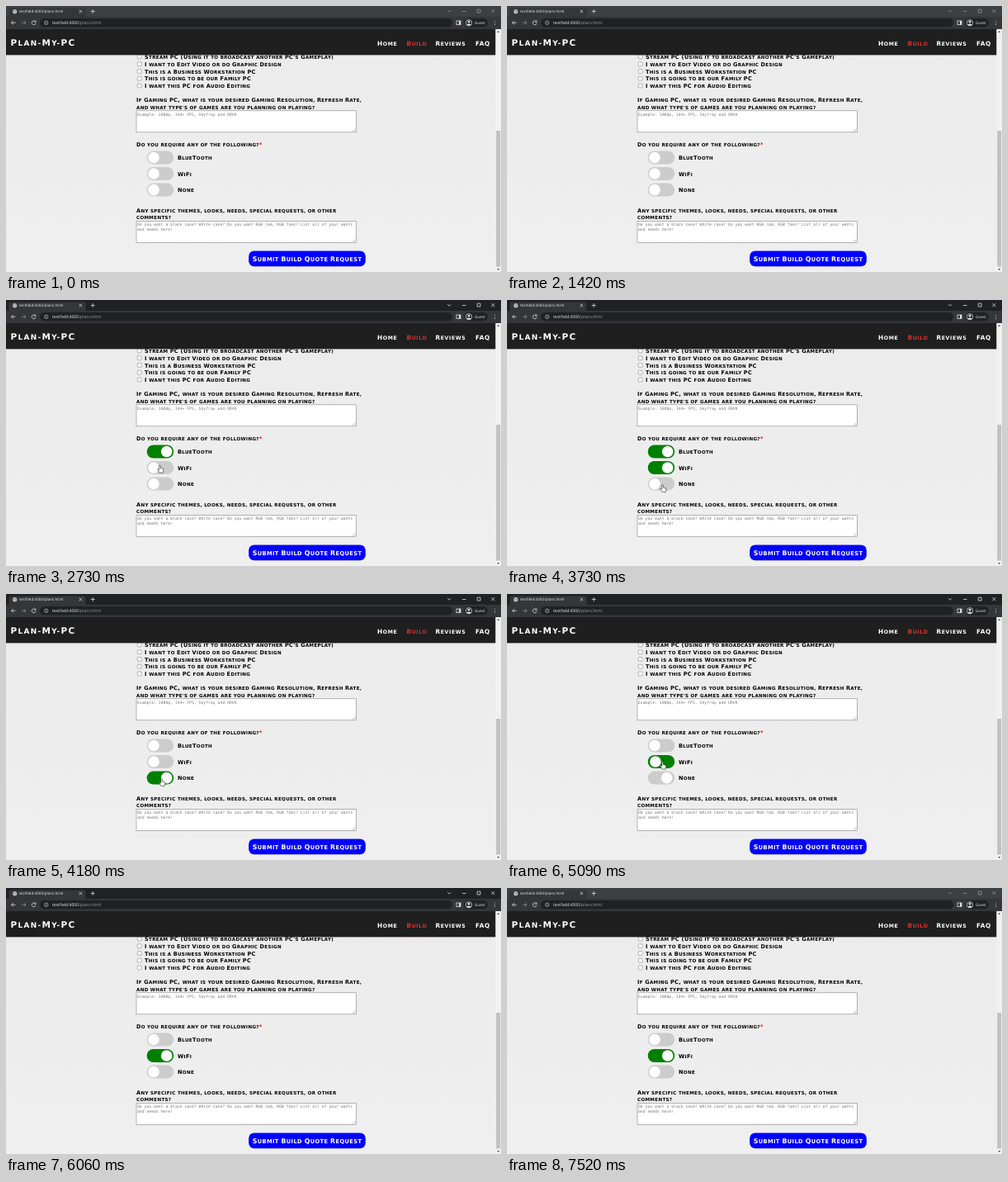
These frames come from a looping animation (600x322 px, 7560 ms). An HTML page:

```html
<!DOCTYPE html>
<html lang="en">
<head>
<meta charset="utf-8">
<title>Quote form</title>
<style>
html, body { margin: 0; width: 100%; height: 100%; overflow: hidden; background: #eee; }
svg { display: block; width: 100vw; height: 100vh; text-rendering: geometricPrecision; }
.wide { font: bold 6.6px "DejaVu Sans", sans-serif; letter-spacing: .3px; text-transform: uppercase; }
.wide .low { font-size: .85em; }
.brand { font-size: 10.5px; letter-spacing: 1.3px; fill: #fff; }
.nav { font-size: 7.4px; letter-spacing: .55px; fill: #fff; }
.nav.current { fill: #d3302f; }
.submit { font-size: 7.9px; letter-spacing: .35px; text-anchor: middle; fill: #fff; }
.hint { font: 4.78px "DejaVu Sans Mono", monospace; fill: #757575; }
.ui { font: 4.6px "Open Sans", sans-serif; fill: #e8eaed; }
.line { fill: none; stroke: #dadce0; stroke-width: .8; }
.field { fill: #fff; stroke: #858585; stroke-width: .6; }
</style>
</head>
<body>
<svg viewBox="0 0 600 322">
  <defs>
    <linearGradient id="paper" x2="0" y2="1">
      <stop stop-color="#ebebec"/><stop offset="1" stop-color="#f0eff0"/>
    </linearGradient>
  </defs>
  <rect width="600" height="322" fill="url(#paper)"/>
  <g id="form"></g>

  <!-- page header -->
  <rect y="28" width="594" height="31.4" fill="#1f1f1f"/>
  <g id="header"></g>

  <!-- scrollbar -->
  <rect x="593.3" y="28" width="6.7" height="294" fill="#f1f1f1"/>
  <rect x="594.2" y="151" width="5" height="164.5" fill="#c1c1c1"/>
  <path d="M595.2 32l1.5-2 1.5 2zM595.2 318l1.5 2 1.5-2z" fill="#505050"/>

  <!-- browser window -->
  <rect id="strip" width="600" height="14"/>
  <path d="M1 14q2.5 0 2.5-2.5V5q0-2.5 2.5-2.5h88q2.5 0 2.5 2.5v6.5q0 2.5 2.5 2.5z" fill="#35363a"/>
  <rect y="13" width="600" height="15" fill="#35363a"/>
  <circle cx="10.7" cy="6.7" r="2.6" fill="#c4c7cb"/>
  <path class="line" d="M8.3 6h2l1 2M11 4.5l2 1.5" style="stroke:#55585d;stroke-width:.6"/>
  <text class="ui" x="16" y="8.3">testfield:4000/plans.html</text>
  <path class="line" d="M88.7 4.8l3.4 3.4m0-3.4l-3.4 3.4M102.7 6.5h5M105.2 4v5"/>
  <path id="controls" class="line" d="M535.2 5.2l2 2 2-2M553 6.5h4.5M571.2 4.2h3.8v3.8h-3.8zM588.3 4.2l4 4m0-4l-4 4"/>
  <path class="line" d="M11.5 20.3h-5m2.3-2.3l-2.3 2.3 2.3 2.3"/>
  <path class="line" d="M19 20.3h5m-2.3-2.3l2.3 2.3-2.3 2.3" stroke-opacity=".5"/>
  <path class="line" d="M35.4 18.6a2.4 2.4 0 1 0 .6 2.3M36 17.5v1.9h-1.9"/>
  <rect x="41" y="15" width="500" height="10.6" rx="5.3" fill="#202124"/>
  <circle class="line" cx="48.7" cy="20.3" r="2.2" style="stroke-width:.6"/>
  <path class="line" d="M48.7 20v1.4M48.7 18.8v.6" style="stroke-width:.6"/>
  <text class="ui" x="56" y="22.2" style="font-size:5.1px">testfield:4000<tspan fill="#9aa0a6">/plans.html</tspan></text>
  <rect class="line" x="546" y="18" width="5" height="4.6"/>
  <rect x="549" y="18" width="2" height="4.6" fill="#dadce0"/>
  <rect x="555.5" y="15" width="28.5" height="10.6" rx="5.3" fill="#202124"/>
  <circle class="line" cx="561" cy="20.3" r="3.7"/>
  <path d="M558.4 22.6q2.6-2.4 5.2 0-2.6 2.4-5.2 0z" fill="#dadce0"/>
  <circle cx="561" cy="19.2" r="1.4" fill="#dadce0"/>
  <text class="ui" x="568" y="22">Guest</text>
  <path d="M592 17.7h.9v.9h-.9zm0 2.2h.9v.9h-.9zm0 2.2h.9v.9h-.9z" fill="#dadce0"/>

  <!-- pointer -->
  <g id="pointer" stroke="#111" stroke-width=".55" stroke-linejoin="round" fill="#fff">
    <path id="arrow" d="M0 0v8.5l2-1.9 1.3 3 1.3-.6-1.3-2.9h2.7z"/>
    <path id="hand" d="M-.8.5q.8-1 1.6 0v3l1.3.2 1.2.4 1 .5v2.2l-.8 2.3h-3.7l-2.6-3.7q.1-1.2 1.2-.6l.8.8z"/>
  </g>
</svg>
<script>
const LOOP = 7560, SLIDE = 400;
const $ = id => document.getElementById(id);

// wide lettering with slightly smaller capitals in place of lowercase
const wide = (x, y, s, kind = '', tail = '') => `<text class="wide ${kind}" x="${x}" y="${y}">` +
  s.replace(/[a-z][^A-Z]*/g, run => `<tspan class="low">${run}</tspan>`) + tail + '</text>';
const hint = (y, s) => `<text class="hint" x="159" y="${y}">${s}</text>`;
const field = y => `<rect class="field" x="158" y="${y}" width="266.3" height="26"/>
  <path d="M420 ${y + 25}l3.3-3.3m-1.5 3.3l1.5-1.5" stroke="#777" stroke-width=".5"/>`;

// times hold the moments at which a switch flips, off first
const switches = [
  { label: 'BlueTooth', y: 183.5, times: [1860, 3780] },
  { label: 'WiFi', y: 203, times: [2750, 3780, 5080] },
  { label: 'None', y: 222.6, times: [3780, 5080] }
];
const options = [
  "Stream PC (Using it to broadcast another PC's Gameplay)",
  'I want to Edit Video or do Graphic Design',
  'This is a Business Workstation PC',
  'This is going to be our Family PC',
  'I want this PC for Audio Editing'
];

$('header').innerHTML =
  wide(5.5, 48.2, 'Plan-My-PC', 'brand') +
  wide(450, 47.5, 'Home', 'nav') +
  wide(485.5, 47.5, 'Build', 'nav current') +
  wide(520.5, 47.5, 'Reviews', 'nav') +
  wide(569, 47.5, 'FAQ', 'nav');

$('form').innerHTML =
  options.map((s, i) => {
    const y = 61.5 + i * 8.75;
    return `<rect class="field" x="159.3" y="${y - 2.4}" width="4.8" height="4.8" rx=".8"/>` + wide(168, y + 2.5, s);
  }).join('') +
  wide(158, 116.3, 'If Gaming PC, what is your desired Gaming Resolution, Refresh Rate,') +
  wide(158, 125.3, "and what type's of games are you planning on playing?") +
  field(126.8) + hint(132.7, 'Example: 1080p, 144+ FPS, Skyfray and ORVK') +
  wide(158, 170.1, 'Do you require any of the following?', '', '<tspan fill="red">*</tspan>') +
  switches.map(s => `<rect x="170.7" y="${s.y - 8}" width="32.5" height="16" rx="8"/>
    <circle cy="${s.y}" r="6.8" fill="#fff"/>` + wide(208, s.y + 2.7, s.label)).join('') +
  wide(158, 249.5, 'Any specific themes, looks, needs, special requests, or other') +
  wide(158, 258.4, 'comments?') +
  field(260.6) +
  hint(266.4, 'Do you want a black case? White case? Do you want RGB ram, RGB fans? List all of your wants') +
  hint(272.3, 'and needs here!') +
  '<rect x="294.2" y="296.4" width="141.6" height="18.8" rx="6.5" fill="#00f"/>' +
  wide(365, 309.1, 'Submit Build Quote Request', 'submit');

const knobs = $('form').querySelectorAll('circle');

// pointer path: time, x, y
const path = [
  [1520, 300, 220], [1760, 188, 184], [2200, 188, 184], [2330, 187, 193],
  [2640, 186.5, 200], [3150, 186.5, 200], [3500, 188.5, 223.5], [4580, 188.5, 223.5],
  [4940, 188.5, 203], [5700, 188.5, 203], [6060, 604, 240]
];
const smooth = p => p * p * (3 - 2 * p);

function pointerAt(t) {
  const i = path.findIndex(p => p[0] > t);
  if (i < 1) return null;
  const [t0, x0, y0] = path[i - 1], [t1, x1, y1] = path[i];
  const p = smooth((t - t0) / (t1 - t0));
  return [x0 + (x1 - x0) * p, y0 + (y1 - y0) * p];
}

function draw(t) {
  const active = t >= 1520 && t < 7420;
  $('strip').setAttribute('fill', active ? '#202124' : '#3c4043');
  $('controls').setAttribute('opacity', active ? 1 : .5);

  switches.forEach((s, i) => {
    const past = s.times.filter(c => c <= t), on = past.length % 2;
    const p = past.length ? Math.min(1, (t - past.at(-1)) / SLIDE) : 1;
    const left = Math.pow(1 - p, 2.3);
    knobs[i].setAttribute('cx', 179 + 15.7 * (on ? 1 - left : left));
    knobs[i].previousElementSibling.setAttribute('fill', on ? 'green' : '#ccc');
  });

  const at = pointerAt(t);
  $('pointer').style.display = at ? '' : 'none';
  if (!at) return;
  const [x, y] = at;
  const over = x > 171 && x < 203 && switches.some(s => Math.abs(y - s.y) < 8);
  $('pointer').setAttribute('transform', `translate(${x} ${y})`);
  $('hand').style.display = over ? '' : 'none';
  $('arrow').style.display = over ? 'none' : '';
}

const start = performance.now();
function frame() {
  draw((performance.now() - start) % LOOP);
  requestAnimationFrame(frame);
}
frame();
</script>
</body>
</html>
```
